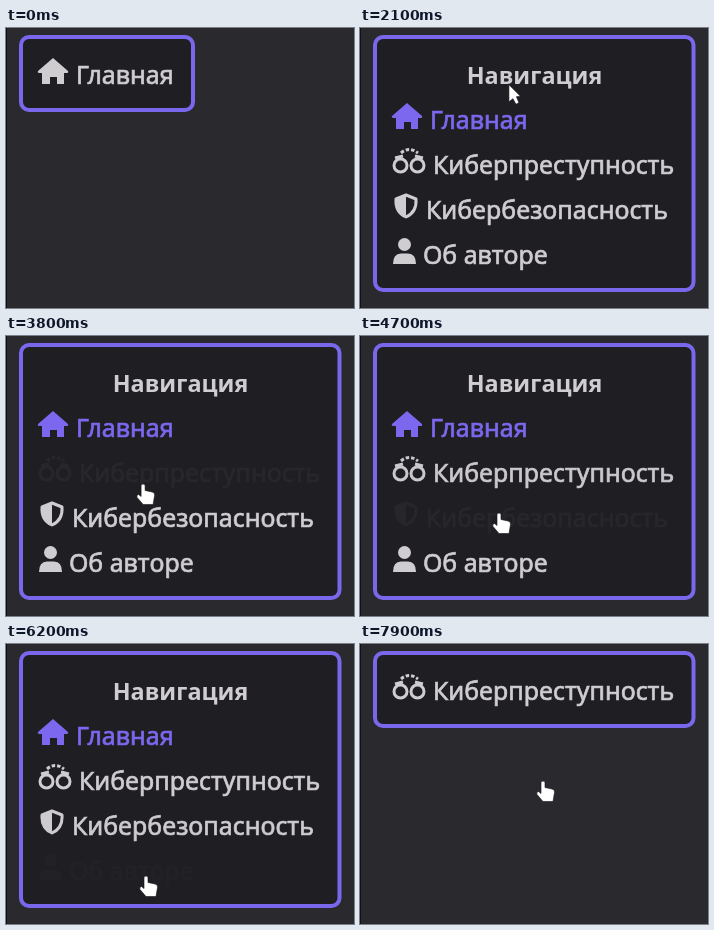
An HTML page for the animation above (8000 ms loop, 348 px wide and 280 px high).

```html
<!DOCTYPE html>
<html lang="ru">
<head>
<meta charset="utf-8">
<style>
  html, body { margin: 0; width: 100%; height: 100%; overflow: hidden; background: #2a292e; }
  svg { display: block; width: 348px; height: 280px; }
  text { font: 500 24.8px "Noto Sans", sans-serif; stroke: currentColor; stroke-width: .7; }
  .title { font-weight: 700; font-size: 23.4px; text-anchor: middle; stroke: none; }
  .row, .title { color: #d0cdd1; fill: currentColor; }
  .row.current { color: #7b68ee; }
  .line { fill: none; stroke: currentColor; stroke-width: 3; }
</style>
</head>
<body>
<svg viewBox="0 0 348 280">
  <rect width="1" height="280" fill="#111014"/>
  <rect id="panel" x="15" y="9" rx="8" fill="#1f1e23" stroke="#7968ec" stroke-width="4"/>
  <text class="title" id="title" x="174.5" y="56">Навигация</text>

  <!-- Each row is drawn with its text baseline at y = 0. -->
  <g class="row">
    <path d="M47 -26L62 -13Q63 -11 60 -11H58V0H51V-7H44V0H36V-11H34Q31 -11 32 -13Z"/>
    <text x="70">Главная</text>
  </g>
  <g class="row">
    <g class="line">
      <circle cx="40.5" cy="-8.5" r="6.5"/>
      <circle cx="57.5" cy="-8.5" r="6.5"/>
      <path d="M35 -16L43 -18M55 -18L63 -16"/>
      <path d="M41 -21Q49 -28 58 -21" stroke-dasharray="3.5 2"/>
    </g>
    <text x="73">Киберпреступность</text>
  </g>
  <g class="row">
    <path class="line" stroke-linejoin="round" d="M46 -24L56 -20Q57 -7 46 -2Q35 -7 36 -20Z"/>
    <path d="M46 -24L36 -20Q35 -7 46 -2Z"/>
    <text x="66">Кибербезопасность</text>
  </g>
  <g class="row">
    <circle cx="44.5" cy="-19.5" r="6.5"/>
    <path d="M33 0Q33 -10.500 41 -10.500H48Q56 -10.500 56 0Z"/>
    <text x="63">Об авторе</text>
  </g>

  <g id="cursor" fill="#fff" stroke="#151418" stroke-width=".6">
    <path id="arrow" d="M0 0L11.5 11.5L7.5 12L10 18L7 19.5L4 14L0 17Z"/>
    <path id="hand" d="M-2 1Q0 -1 2 1V6.500L9 8Q12 8.500 11.500 11.500L10 20.500H0L-6 13.500Q-7 11 -4.500 10.500L-2 12.500Z"/>
  </g>
</svg>
<script>
const LOOP = 8000, STEP = 100;
const OPEN_AT = 1300, CLOSE_AT = 7800;
const MOVE_TIME = 800, FADE_TIME = 250, FADE_STEP = 10;
const ROW_HEIGHT = 45, LINK_HEIGHT = 34, CLOSED_BASELINE = 56;

const entry = { x: 342, y: 193 };
const moves = [
  { at: 700, x: 152, y: 39 },
  { at: 2000, x: 136, y: 131 },
  { at: 3600, x: 139, y: 177 },
  { at: 4900, x: 140, y: 232 },
  { at: 6400, x: 183, y: 137 }
];

const get = id => document.getElementById(id);
const panel = get("panel"), title = get("title"), cursor = get("cursor");
const arrow = get("arrow"), hand = get("hand");
const rows = [...document.querySelectorAll(".row")];
const show = (el, visible) => el.style.display = visible ? "" : "none";
const isOpen = t => t >= OPEN_AT && t < CLOSE_AT;
const baseline = i => 101 + ROW_HEIGHT * i;

function cursorAt(t) {
  let { x, y } = entry;
  for (const move of moves) {
    const p = Math.min(1, Math.max(0, (t - move.at) / MOVE_TIME));
    const eased = 1 - (1 - p) ** 1.6;
    x += (move.x - x) * eased;
    y += (move.y - y) * eased;
  }
  return { x, y };
}

function hoveredRow(t) {
  const { y } = cursorAt(t);
  return rows.findIndex((_, i) => Math.abs(y - baseline(i) + LINK_HEIGHT / 2 - 1) < LINK_HEIGHT / 2);
}

// A link under the cursor fades out; all others fade back in.
function rowOpacities(t) {
  const opacities = rows.map(() => 1);
  for (let s = OPEN_AT; s < t; s += FADE_STEP) {
    const hovered = hoveredRow(s);
    for (let i = 1; i < rows.length; i++) {
      const goal = i === hovered ? 0 : 1;
      opacities[i] += (goal - opacities[i]) * FADE_STEP / FADE_TIME;
    }
  }
  return opacities;
}

function draw(t) {
  const open = isOpen(t);
  const current = t < CLOSE_AT ? 0 : 1;
  const opacities = rowOpacities(t);

  panel.setAttribute("width", open || current === 1 ? 318.5 : 172);
  panel.setAttribute("height", open ? 253 : 73);
  show(title, open);

  rows.forEach((row, i) => {
    show(row, open || i === current);
    row.setAttribute("transform", `translate(0 ${open ? baseline(i) : CLOSED_BASELINE})`);
    row.style.opacity = open ? opacities[i] : 1;
    row.classList.toggle("current", open && i === current);
  });

  const { x, y } = cursorAt(t);
  const overLink = t >= OPEN_AT && y > 75;
  show(cursor, t >= moves[0].at);
  show(arrow, !overLink);
  show(hand, overLink);
  cursor.setAttribute("transform", `translate(${x} ${y})`);
}

const start = performance.now();
let drawn = -1;
function frame() {
  const t = Math.floor((performance.now() - start) % LOOP / STEP) * STEP;
  if (t !== drawn) draw(drawn = t);
  requestAnimationFrame(frame);
}
frame();
</script>
</body>
</html>
```
